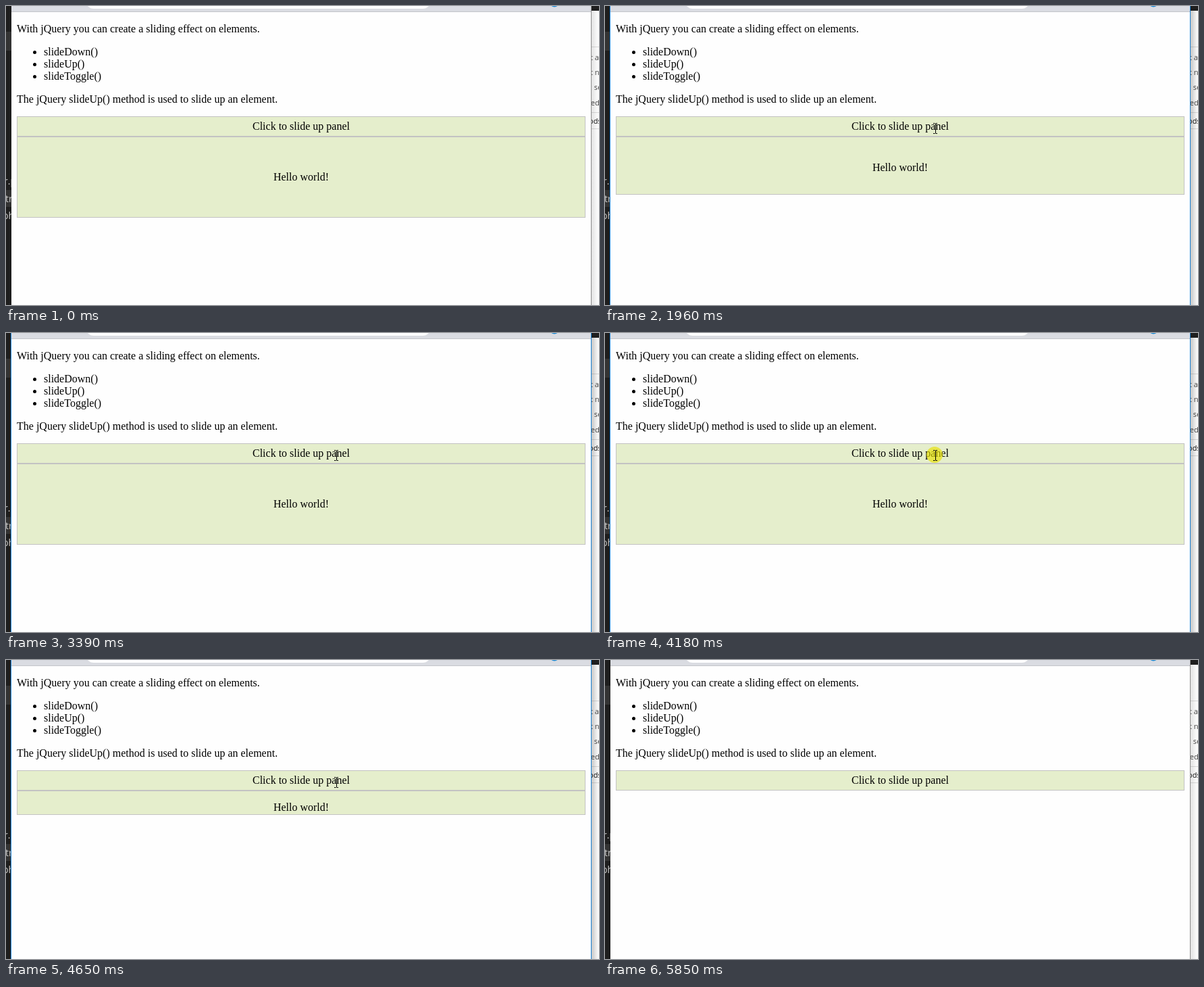
Recreate the animation shown at these times as an HTML page. Size 878x442 px, loop 5.98 s.

```html
<!DOCTYPE html>
<html lang="en">
<head>
<meta charset="utf-8">
<title>Slide up panel</title>
<style>
  html, body { margin: 0; width: 100%; height: 100%; overflow: hidden; background: #fff; }
  svg { display: block; width: 878px; height: 442px; }
  .page { font: 16px "Liberation Serif", "Times New Roman", serif; }
  .code { font: 14px "Open Sans", sans-serif; fill: #ccc; }
  .side { font: 11px "Open Sans", sans-serif; fill: #444; }
  .box { fill: #e5eecc; stroke: #c3c3c3; }
  .mid { text-anchor: middle; }
</style>
</head>
<body>
<svg viewBox="0 0 878 442" xmlns="http://www.w3.org/2000/svg">
  <defs>
    <clipPath id="panelClip"><rect id="clipBox" x="17" y="194" width="840" height="118"/></clipPath>
    <linearGradient id="shade">
      <stop offset="0" stop-opacity=".22"/>
      <stop offset="1" stop-opacity="0"/>
    </linearGradient>
  </defs>

  <!-- editor behind, left -->
  <rect width="9" height="442" fill="#1e1e1e"/>
  <rect y="38" width="9" height="28" fill="#333"/>
  <rect y="272" width="9" height="25" fill="#333"/>
  <g class="code">
    <text x="-3" y="264">r.p</text>
    <text x="-1" y="290">tr</text>
    <text x="-5" y="315">ph</text>
  </g>

  <!-- window behind, right -->
  <rect x="866" width="12" height="442" fill="#fff"/>
  <rect x="866" width="12" height="7" fill="#1e1e1e"/>
  <path d="M866 60.5h12M866 157.5h12M866 181.5h12" stroke="#ddd"/>
  <g class="side">
    <text x="865" y="80">t a</text>
    <text x="865" y="102">t n</text>
    <text x="865" y="124">: se</text>
    <text x="863" y="147">led</text>
    <text x="863" y="174" fill="#111">ods</text>
  </g>
  <rect id="shadow" x="867" y="7" width="11" height="435" fill="url(#shade)"/>

  <!-- browser window -->
  <rect x="8" width="858" height="442" fill="#fefefe"/>
  <rect x="8" width="858" height="9" fill="#dadce2"/>
  <path d="M8 8.5h858" stroke="#c4c5c9"/>
  <rect x="118" y="-20" width="511" height="24" rx="12" fill="#fff"/>
  <circle cx="812" cy="-6" r="7.5" fill="#1a8ad4"/>
  <path id="frame" d="M7.5 0V442M866.5 0V442"/>

  <g class="page">
    <text x="16" y="39">With jQuery you can create a sliding effect on elements.</text>
    <circle cx="42.5" cy="68.5" r="2.5"/><text x="56" y="73">slideDown()</text>
    <circle cx="42.5" cy="86.5" r="2.5"/><text x="56" y="91">slideUp()</text>
    <circle cx="42.5" cy="104.5" r="2.5"/><text x="56" y="109">slideToggle()</text>
    <text x="16" y="143">The jQuery slideUp() method is used to slide up an element.</text>
    <rect class="box" x="16.5" y="163.5" width="841" height="29"/>
    <text class="mid" x="437" y="183">Click to slide up panel</text>
    <g id="panel">
      <rect id="panelBox" class="box" x="16.5" y="193.5" width="841" height="119"/>
      <g clip-path="url(#panelClip)"><text id="hello" class="mid" x="437" y="258">Hello world!</text></g>
    </g>
  </g>

  <circle id="press" cx="488" cy="180" r="12" fill="#e8e000" fill-opacity=".65"/>
  <path id="arrow" d="M.5 .5V16.5L4.5 12.8L7 18.5L9.5 17.5L7 11.8H11.8Z" fill="#fff" stroke="#000"/>
  <path id="beam" d="M-3 -7.5h2.5m1 0h2.5M.5 -7V7M-3 7.5h2.5m1 0h2.5" fill="none" stroke="#000"/>
</svg>
<script>
const LOOP = 5980;
const $ = id => document.getElementById(id);
const within = (t, from, to) => t >= from && t < to;
const show = (id, on) => $(id).setAttribute("visibility", on ? "visible" : "hidden");
const set = (id, name, value) => $(id).setAttribute(name, value);

const entry = [799, 420], rest = [603, 256], link = [489, 181], exit = [572, 214];
const easeOut = p => 1 - (1 - p) ** 2;
const mix = (a, b, p) => a.map((v, i) => Math.round(v + (b[i] - v) * p));

// The screen is sampled in coarse ticks: count of ticks since a start time.
const ticks = (t, start, length) => Math.floor((t - start) / length + 1e-6);

function pointer(t) {
  if (t < 140 || t >= 5180) return null;
  if (t < 540) return mix(entry, rest, easeOut(Math.min(1, ticks(t, 140, 200 / 3) / 3)));
  if (t < 5120) return mix(rest, link, easeOut(Math.min(1, (ticks(t, 540, 410 / 6) + 1) / 7)));
  return exit;
}

// Remaining part of the panel under swing easing; 0 means hidden.
function swing(t, start, duration) {
  const p = (t - start) / duration;
  return p >= 1 ? 0 : 0.5 + Math.cos(Math.PI * Math.max(0, p)) / 2;
}

function openness(t) {
  if (t < 1750) return 1;
  if (t < 3390) return swing(1750 + 70 * ticks(t, 1750, 70), 1735, 625);
  if (t < 4310) return 1;
  const step = 610 / 9;
  return swing(4310 + step * ticks(t, 4310, step), 4292, 560);
}

function draw(t) {
  const focused = within(t, 1550, 5850);
  set("frame", "stroke", focused ? "#1a80d2" : "#8c8c8c");
  set("frame", "d", focused ? "M7.5 0V442M866.5 0V442" : "M866.5 0V442");
  set("shadow", "opacity", focused ? 1 : 0.5);

  const open = openness(t);
  const inner = Math.round(118 * open);
  show("panel", open > 0);
  set("panelBox", "height", inner + 1);
  set("clipBox", "height", inner);
  set("hello", "y", Math.round(208 + 50 * open));

  show("press", within(t, 1550, 1750) || within(t, 4180, 4310));

  const at = pointer(t);
  const overText = !!at && at[0] < 510 && at[1] < 188;
  show("arrow", at && !overText);
  show("beam", overText);
  if (at) set(overText ? "beam" : "arrow", "transform", `translate(${at})`);
}

function tick() {
  draw(performance.now() % LOOP);
  requestAnimationFrame(tick);
}
tick();
</script>
</body>
</html>
```
